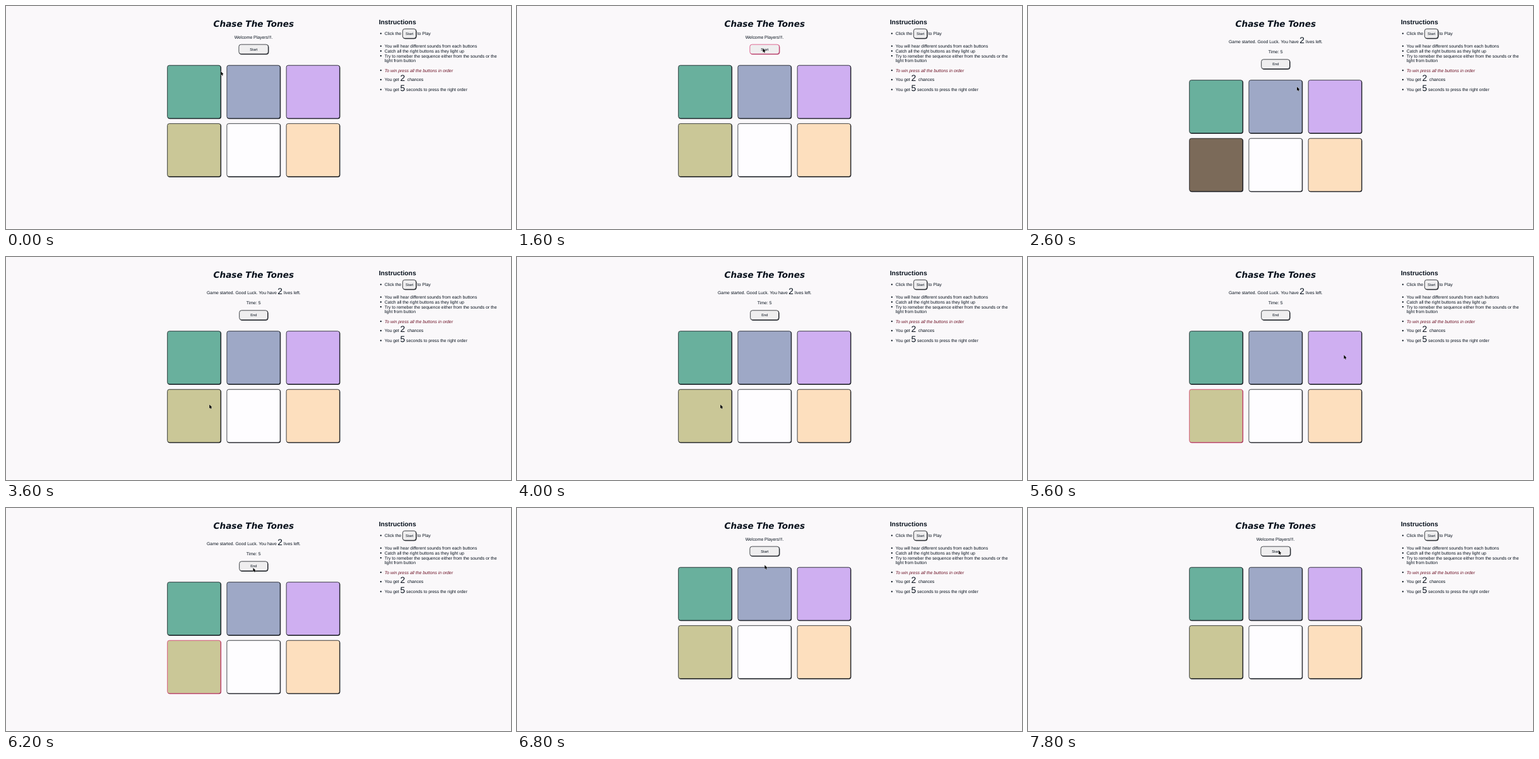
An HTML page that plays this animation: 800x354 px, repeating every 8 s.

```html
<!DOCTYPE html>
<html lang="en">
<head>
<meta charset="utf-8">
<title>Chase The Tones</title>
<style>
  html, body { margin: 0; width: 100%; height: 100%; overflow: hidden; background: #faf8fa; }
  svg { display: block; width: 100%; height: 100%; }
  text {
    font-family: "Liberation Sans", Arial, sans-serif;
    font-size: 6.88px;
    fill: #06101c;
    text-rendering: geometricPrecision;
    white-space: pre;
  }
  .mid { text-anchor: middle; }
  .title { font: italic bold 13.6px "DejaVu Sans", Verdana, sans-serif; }
  .head { font-size: 10.3px; font-weight: bold; }
  .big { font-size: 13.76px; }
  .label { font-size: 5.73px; }
  .goal { font-style: italic; fill: #6c1024; }
</style>
</head>
<body>
<svg id="stage" viewBox="0 0 800 354"></svg>
<script>
const LOOP = 8000, STEP = 200;
const INK = '#10141a', PINK = '#d63a70', OLIVE = '#cac797', BROWN = '#7b6a59';
const GAME = [1800, 6400];                  // game is running
const LIT = [[2400, 3000], [4400, 5200]];   // olive pad lights up
const PICKED = 4400;                        // olive pad takes focus

// Pointer stops: time, x, y
const PATH = [
  [0, 340.3, 103.7], [1200, 389.5, 67.3], [1800, 389.5, 67.3],
  [2600, 426.1, 128.2], [3600, 322.2, 234.2], [4200, 322.2, 234.2],
  [4800, 609.4, 216.2], [5200, 609.4, 216.2], [6000, 391.5, 94.9],
  [6600, 391.5, 94.9], [7400, 397, 67.2], [8000, 397, 67.2]
];

const stage = document.getElementById('stage');

function add(parent, tag, attrs, text) {
  const el = document.createElementNS('http://www.w3.org/2000/svg', tag);
  for (const key in attrs) el.setAttribute(key, attrs[key]);
  if (text) el.textContent = text;
  parent.appendChild(el);
  return el;
}

const group = parent => add(parent, 'g', {});
const write = (parent, x, y, text, cls = '') => add(parent, 'text', { x, y, class: cls }, text);

// Rounded box whose border is heavier at the right and bottom
function box(parent, x, y, width, height, rx, fill) {
  add(parent, 'rect', { x: x + .65, y: y + .65, width, height, rx, fill: INK, stroke: INK, 'stroke-width': .7 });
  return add(parent, 'rect', { x, y, width, height, rx, fill, stroke: INK, 'stroke-width': .75 });
}

function button(parent, x, y, width, height, label) {
  const face = box(parent, x, y, width, height, 3.4, '#efeeef');
  write(parent, x + width / 2 + .2, y + height / 2 + 2.1, label, 'mid label');
  return face;
}

function item(y, text, cls) {
  add(stage, 'circle', { cx: 593.8, cy: y - 2.3, r: 1.15, fill: '#06101c' });
  write(stage, 599.7, y, text, cls);
}

add(stage, 'rect', { width: 800, height: 354, fill: '#faf8fa' });
add(stage, 'rect', { y: 353, width: 800, height: 1, fill: '#fff' });
write(stage, 392.3, 33.4, 'Chase The Tones', 'title mid');

// Instructions
write(stage, 590.7, 28.8, 'Instructions', 'head');
item(46, 'Click the');
button(stage, 628.3, 36.3, 21.2, 15, 'Start');
write(stage, 651.7, 46, 'to Play');
item(66, 'You will hear different sounds from each buttons');
item(73.8, 'Catch all the right buttons as they light up');
item(81.5, 'Try to remeber the sequence either from the sounds or the');
write(stage, 599.7, 89.2, 'light from button');
item(104.5, 'To win press all the buttons in order', 'goal');
item(119.3, 'You get');
write(stage, 624.4, 119.3, '2', 'big');
write(stage, 635.7, 119.3, 'chances');
item(135, 'You get');
write(stage, 624.4, 135, '5', 'big');
write(stage, 634, 135, 'seconds to press the right order');

// Start screen
const idle = group(stage);
write(idle, 392.2, 52, 'Welcome Players!!!.', 'mid');
const start = button(idle, 368.9, 61.1, 46.5, 15, 'Start');

// Game screen
const game = group(stage);
write(game, 318, 58.8, 'Game started. Good Luck. You have');
write(game, 430.3, 58.8, '2', 'big');
write(game, 440, 58.8, 'lives left.');
write(game, 392.2, 75.3, 'Time: 5', 'mid');
button(game, 369.7, 84.8, 44.8, 15, 'End');

// Pads
const board = group(stage);
const pads = ['#69b09d', '#9ea8c6', '#cfaff1', OLIVE, '#fefdff', '#fddfbe'].map((fill, i) =>
  box(board, 255.7 + i % 3 * 94.2, 94.2 + Math.floor(i / 3) * 92.5, 84.3, 84.1, 3, fill));

const pointer = add(stage, 'path', {
  d: 'M0 0V6.2L1.4 5 2.4 7.1 3.4 6.6 2.5 4.6H4.4Z',
  fill: '#000', stroke: '#fff', 'stroke-width': .5, 'paint-order': 'stroke'
});

const within = (t, [from, to]) => t >= from && t < to;

function pointerAt(t) {
  const i = PATH.findIndex(stop => stop[0] > t);
  const [t0, x0, y0] = PATH[i - 1], [t1, x1, y1] = PATH[i];
  const p = (t - t0) / (t1 - t0), e = p * p * (3 - 2 * p);
  return [x0 + (x1 - x0) * e, y0 + (y1 - y0) * e];
}

function draw(t) {
  const playing = within(t, GAME);
  const focus = (el, on) => el.setAttribute('stroke', on ? PINK : INK);
  idle.setAttribute('visibility', playing ? 'hidden' : 'visible');
  game.setAttribute('visibility', playing ? 'visible' : 'hidden');
  board.setAttribute('transform', `translate(0 ${playing ? 23.5 : 0})`);
  pads[3].setAttribute('fill', LIT.some(span => within(t, span)) ? BROWN : OLIVE);
  focus(pads[3], playing && t >= PICKED);
  pads[3].previousSibling.setAttribute('stroke', playing && t >= PICKED ? PINK : INK);
  focus(start, within(t, [1400, GAME[0]]));
  start.previousSibling.setAttribute('stroke', within(t, [1400, GAME[0]]) ? PINK : INK);
  pointer.setAttribute('transform', `translate(${pointerAt(t)})`);
}

let origin;
function tick(now) {
  origin ??= now;
  draw(Math.floor((now - origin) % LOOP / STEP) * STEP);
  requestAnimationFrame(tick);
}
draw(0);
requestAnimationFrame(tick);
</script>
</body>
</html>
```
